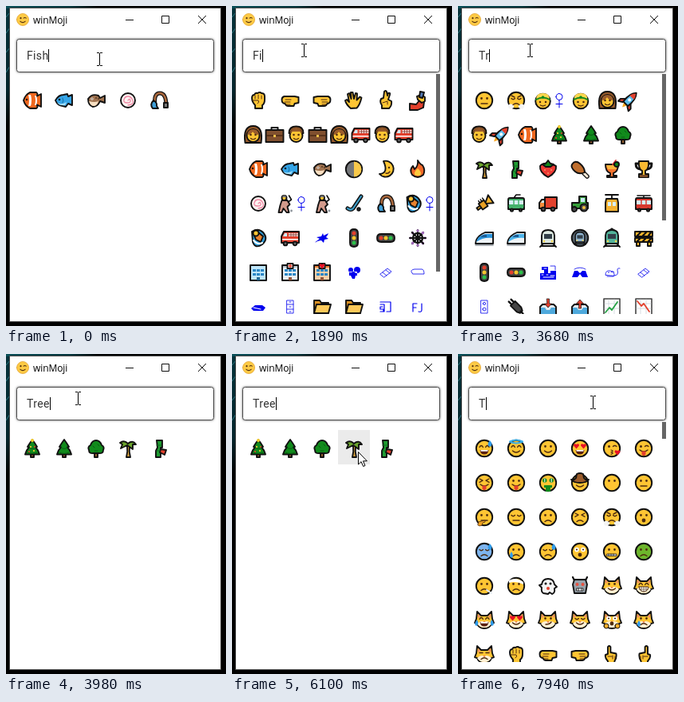
Write an HTML page that moves like this. It is 276x400 px and loops after 8 s.

```html
<!DOCTYPE html>
<html lang="en">
<head>
<meta charset="utf-8">
<title>winMoji</title>
<style>
  html, body { margin: 0; width: 100%; height: 100%; overflow: hidden; background: #000; }
  svg { display: block; width: 276px; height: 400px; }
  #lists path, #icon path { stroke-linejoin: round; stroke-linecap: round; }
  .title { font: 12px "Open Sans", "Noto Sans", sans-serif; letter-spacing: -.1px; }
  .query { font: 14px Roboto, Arial, sans-serif; letter-spacing: .35px; fill: #333; }
  .field { fill: #fff; stroke: #4a4a4a; filter: drop-shadow(0 0 1.5px rgba(0, 0, 0, .6)); }
</style>
</head>
<body>
<svg viewBox="0 0 276 400">
  <defs>
    <linearGradient id="sea" x2="0" y2="1">
      <stop stop-color="#06333b"/><stop offset=".7" stop-color="#04252c"/><stop offset="1"/>
    </linearGradient>
    <linearGradient id="sky"><stop stop-color="#0a4f58"/><stop offset=".7" stop-color="#06363d"/><stop offset="1"/></linearGradient>
    <clipPath id="pane"><path d="M5 85h264v300h-264z"/></clipPath>
  </defs>
  <path d="M0 0h276v400h-276z"/>
  <path d="M0 0h5v150h-5z" fill="url(#sea)"/>
  <path d="M0 0h115v3h-115z" fill="url(#sky)"/>
  <path d="M0 14l5-6M0 34l5-7M0 58l5-6M0 83l5-8" stroke="#2a7680"/>
  <path d="M4.500 2.500h265v392h-265z" fill="#fff" stroke="#484848"/>
  <g id="icon" transform="translate(21 17) scale(.72)"></g>
  <text class="title" x="34" y="22">winMoji</text>
  <path d="M150 17.500h10M195.500 12.500h9v9h-9zM241 12l10 10M251 12l-10 10" fill="none" stroke="#111"/>
  <rect id="hover" y="95" width="40" height="43" fill="#ebebeb"/>
  <g id="lists" clip-path="url(#pane)"></g>
  <rect id="bar" x="256" y="85" width="5" fill="#666"/>
  <rect class="field" x="13.500" y="41.500" width="247" height="41" rx="3"/>
  <text id="query" class="query" x="26" y="67"></text>
  <rect id="caret" y="54" width="1" height="16"/>
  <g id="mouse">
    <path id="beam" d="M-3.500-8h3M.5-8h3M-3.500 8h3M.5 8h3M0-7.500v15" fill="none" stroke="#000"/>
    <path id="arrow" d="M.5.5v15.500l3.600-3.400 2.600 5.900 2.300-1-2.500-5.700h4.900z" fill="#fff" stroke="#000"/>
  </g>
</svg>
<script>
const INK = '#111', SKIN = '#ffc533', BROWN = '#4f2d10', HAIR = '#9a5c2b', RED = '#e3402d', WHITE = '#fff',
      GREEN = '#118a1c', BLUE = '#2f9bea', GREY = '#8d949b';

const path = (d, fill, stroke = 'none', w = 1) =>
  `<path d="${d}" fill="${fill}" stroke="${stroke}" stroke-width="${w}"/>`;
const O = (d, c) => path(d, c, INK, 1.9);
const F = (d, c) => path(d, c);
const L = (d, c = BROWN, w = 1.4) => path(d, 'none', c, w);
const link = d => L(d, '#00e', .8);
const circ = (x, y, r) => `M${x - r} ${y}a${r} ${r} 0 1 0 ${2 * r} 0a${r} ${r} 0 1 0 ${-2 * r} 0z`;
const pair = (x, y, r) => circ(-x, y, r) + circ(x, y, r);
const rect = (x, y, w, h) => `M${x} ${y}h${w}v${h}h${-w}z`;
const heart = (x, y) => F(`M${x} ${y + 3.5}l-3.500-4q0-3.500 3.500-1.500q3.500-2 3.500 1.500z`, '#e81224');
const turn = (a, s) => `<g transform="rotate(${a})">${s}</g>`;
const flip = s => `<g transform="scale(-1 1)">${s}</g>`;

// Pieces the faces are put together from
const disc = c => O(circ(0, 0, 10.2), c);
const part = {
  face: disc(SKIN), icy: disc('#7db4ee'), sick: disc('#6db52c'), pale: disc('#f4f4f4'),
  cat: O('M-9-11l5 5h8l5-5 1 9 2 5-3 1q-2 6-9 6t-9-6l-3-1 2-5z', SKIN) + F('M-9 4q5-5 9-2 4-3 9 2-3 5-9 5t-9-5z', '#fff1d6') +
    F('M-8-8l3 3-3 2zM8-8l-3 3 3 2z', '#f08a6c') + F('M-1.500 1.500h3l-1.500 1.500z', RED),
  dots: F(pair(3.5, -2.5, 1.4), BROWN),
  arcs: L('M-6-1.500q2.200-4 4.400 0M1.600-1.500q2.200-4 4.400 0'),
  shut: L('M-6-2.500q2.200 2.500 4.400 0M1.600-2.500q2.200 2.500 4.400 0'),
  squint: L('M-6-5l4 2.200-4 2.200M6-5l-4 2.200 4 2.200'),
  lines: L('M-6-2.500h4M2-2.500h4'),
  wink: F(circ(-3.5, -2.5, 1.5), BROWN) + L('M1.500-2.500q2.200-2 4.400 0'),
  wide: F(pair(4, -2.5, 2.8), WHITE) + F(pair(4, -2.5, 1.1), BROWN),
  roll: F(pair(4, -2.5, 2.8), WHITE) + F(pair(4, -4, 1.3), BROWN),
  hearts: heart(-4.5, -3) + heart(4.5, -3),
  shades: F('M-10-5h20l-1.500 4q-4 3.500-7-1h-3q-3 4.500-7 1z', INK),
  specs: path(pair(4.5, -2.5, 3.6), WHITE, INK, 1.6) + F(pair(4.5, -2.5, 1.2), INK) + F(rect(-1.5, 3, 3, 3), WHITE),
  cash: F(pair(4.2, -3, 2.7), GREEN) + L('M-4.200-5v4M4.200-5v4', WHITE, 1) + F('M-5 3h10v3h-2v5h-6v-5h-2z', GREEN),
  smile: L('M-4.500 3q4.500 4 9 0'),
  open: F('M-5.500 2h11q-.5 5.500-5.500 5.500t-5.500-5.500z', '#5a2010') + F(rect(-4.5, 2, 9, 1.7), WHITE),
  teeth: path('M-6 1h12q-1 6-6 6t-6-6z', WHITE, BROWN, 1) + L('M-5.500 4h11M-3 1v5M0 1v6M3 1v5', BROWN, .6),
  gritted: path(rect(-5.5, 2, 11, 4), WHITE, BROWN, 1) + L('M-5.500 4h11M-3 2v4M0 2v4M3 2v4', BROWN, .6),
  flat: L('M-4 4h8'), frown: L('M-4 5.500q4-3.500 8 0'), round: F(circ(0, 4, 2.4), BROWN),
  kiss: L('M-1 2q4.500 1.200 0 2.700q4.500 1.200 0 2.700', BROWN, 1.2),
  smirk: L('M-3 5q5 0 7-3'),
  tongue: L('M-5 2q5 4 10 0') + F('M-2.500 3.500h5v4q-2.500 3.500-5 0z', RED),
  lick: L('M-5 2q5 6 10 0') + F('M1 5l4-3q4 3 0 5z', RED),
  zip: path(rect(-6, 3, 12, 2.5), '#c4c9ce', INK, .7) + L('M-4 3v2M-1 3v2M2 3v2', INK, .7),
  puff: F('M-3 5q-8-2-7 3t7 1zM3 5q8-2 7 3t-7 1z', '#f4f4f4') + L('M-6-6l4 2M6-6l-4 2'),
  halo: path('M-8-8.500q8-4 16 0q-8 4-16 0z', 'none', '#39aee8', 2),
  tears: F('M-9-1q-5 6-1 8q4-2 1-8zM9-1q5 6 1 8q-4-2-1-8z', BLUE),
  tear: F('M-6 0q-4 6 0 8q4-2 0-8z', BLUE), drop: F('M7-10q5 6 0 8q-5-2 0-8z', BLUE),
  blush: F(pair(7, 2, 2), '#f58f55'), nose: F(circ(0, 1, 2.3), RED),
  love: heart(7, 5),
  hat: O('M-11-4q4 1 6-2l1-5q4-2 8 0l1 5q2 3 6 2q-3 4-11 4t-11-4z', HAIR),
  wig: F(pair(9, -5, 3.5), RED) + L('M-4 4q4 4 8 0', RED, 2.5),
  palms: path(pair(7, 7, 3), '#f5ad2a', INK, 1),
  chin: path('M-7 6l3-1 5-1 0 2-3 1-1 3q-3 2-5 0z', '#f0a022', BROWN, .8),
  stick: L('M3 5l6 4', '#e6eef4', 2), band: F('M-9-7q9-5 18 2v3q-9-5-18-2z', WHITE)
};

const faces = {
  grin: 'face dots teeth', grimace: 'face dots gritted', beam: 'face arcs teeth', joy: 'face arcs open tears',
  smiley: 'face dots open', happy: 'face arcs open', phew: 'face arcs open drop', laugh: 'face squint open',
  angel: 'face arcs smile halo', winky: 'face wink smile', shy: 'face arcs smile blush', slight: 'face dots smile',
  yum: 'face arcs lick', calm: 'face shut smile', adore: 'face hearts open', kissy: 'face wink kiss love',
  peck: 'face dots kiss', peck2: 'face arcs kiss', peck3: 'face shut kiss blush', cheeky: 'face wink tongue',
  bleh: 'face squint tongue', tease: 'face dots tongue', rich: 'face cash', nerd: 'face specs', cool: 'face shades smile',
  clown: 'pale dots wig nose', cowboy: 'face dots smile hat', hug: 'face arcs open palms', smug: 'face dots smirk',
  mute: 'face dots', meh: 'face dots flat', blank: 'face lines flat', bored: 'face lines frown', eyeroll: 'face roll flat',
  think: 'face dots flat chin', fib: 'face dots nose flat', blushed: 'face wide flat blush', pensive: 'face shut flat',
  sad: 'face dots frown', endure: 'face squint frown', huff: 'face shut puff frown', gasp: 'face dots round',
  cold: 'icy shut frown drop', cry: 'face dots frown tear', sweat: 'face shut frown drop', amazed: 'face wide round',
  zipped: 'face dots zip', queasy: 'sick dots frown', fever: 'face dots frown stick', hurt: 'face dots frown band',
  cat: 'cat dots smile', catGrin: 'cat arcs teeth', catJoy: 'cat arcs open tears', catLove: 'cat hearts smile',
  catSmug: 'cat dots smirk', catKiss: 'cat shut smile', catScream: 'cat wide round palms', catCry: 'cat dots frown tear',
  catPout: 'cat lines frown'
};
const art = {};
for (const k in faces) art[k] = faces[k].split(' ').map(p => part[p]).join('');

const person = (hair, fringe) => O(hair, HAIR) + O(circ(0, 1, 8), SKIN) + F(fringe, HAIR) +
  F(pair(3, 0, 1.3), BROWN) + L('M-3 4.500q3 2.500 6 0', BROWN, 1.2);
const fistL = O('M-10.500-1q0-3 3-4h13l5 1v7l-5 1-1 3h-7q-3 0-4-3-4 0-4-5z', SKIN) + L('M-6-1h7M-7 2h7M-5 5h5', BROWN, 1);
const point = O('M-5 11v-3q-4-4-3-8l3-1v-9q1.700-2 3.400 0v7l7 1.500q1 5-2 9.500v3z', SKIN) + L('M-5 2h5M1 1v4M4 2v3', BROWN, 1);
const lights = O('M-5-6q0-5 5-5t5 5v12q0 5-5 5t-5-5z', '#454545') + F(circ(0, -6, 2.5), RED) +
  F(circ(0, 0, 2.5), '#f5c52e') + F(circ(0, 6, 2.5), '#2cc04a');
const building = (wall, trim, sign) => O(rect(-10, -9, 20, 19), wall) + F(rect(-9, -8, 18, 2), trim) +
  F([-7, -2, 3].map(x => rect(x, -4, 4, 3) + rect(x, 1, 4, 3)).join(''), '#2b87c6') + sign;
const bus = (c, top) => O('M-10-5q0-2 2-2h16q2 0 2 2v12h-20z', c) + F('M-9-4h18v5h-18z', '#d8f0f8') +
  L('M-3-4v5M3-4v5M-9 3h18', c, 1.5) + O(pair(5.5, 8, 1.6), '#555') + L(top, INK, 1.6);
const train = c => L('M-6 7l-4 4M6 7l4 4M-8 10h16', INK, 1.8) + O('M-8 7v-10q0-7 8-7t8 7v10z', c) +
  F('M-5-5h10v6h-10z', '#333f49') + F(pair(5, 4, 1.3), '#f9d34b');
const bullet = c => O('M-11 7q0-7 8-12l4-2h10v14z', '#eef3f7') + F('M-10 5q2-8 11-10h9v5q-12-1-20 5z', c) +
  F('M-5-1l4-3h4v3z', '#1d5c94') + L('M-11 9h22', GREY, 1.6);
const fir = gold => O('M-2 7h4v4h-4z', '#8a5527') + O('M0-11q3 4 6 9l-2 .5q4 4 5 9h-18q1-5 5-9l-2-.5q3-5 6-9z', GREEN) +
  L('M-4-1q4 3 8 0M-6 5q6 3 12 0', '#075e10', 1) + gold;
const chart = (d, c) => path(rect(-10, -10, 20, 20), WHITE, '#444', 1.6) + L('M-9-4h18M-9 2h18M-4-9v18M3-9v18', '#ccd3da', .8) + L(d, c, 1.8);
const tray = (d, c) => O('M-10 0l3-3h14l3 3v10h-20z', '#e3eaef') + F('M-9 1h5l2 3h4l2-3h5v8h-18z', '#4ea9dc') + path(d, c, INK, .7);
const folder = O('M-10-8h7l2 3h9v13h-18z', '#d98f22') + O('M-7-3h18l-3 11h-18z', '#fdc95a');
const sport = gear => O('M-4-4h7l3 5-3 3 2 7h-3l-4-5-2 5h-4l2-9z', '#d39a8b') + O(circ(-1, -7, 3), SKIN) + F('M-4-8q3-5 6 0z', '#777') + gear;
const engine = O('M-11-2l3-6h19v14h-22z', RED) + F('M-9-2l2-4h3v4z', '#cfeaf5') + F(rect(-2, -6, 12, 4), '#f1d6d2') +
  L('M-2-4h12M1-6v4M4-6v4M7-6v4', '#8b3b34', .8) + F(rect(-10, 1, 20, 1.5), WHITE) + O(pair(6, 7, 2.4), '#666');
const wheel = a => turn(a, L('M0-10v20', INK, 2) + F(pair(9, 0, 1.8), '#a06bb8'));

Object.assign(art, {
  rofl: turn(-35, art.joy), upside: turn(180, art.beam), fistL, fistR: flip(fistL), point, point2: flip(point),
  hundred: turn(-8, L('M-9-6v9M-4-6q-3 4 0 8q4-4 0-8zM5-6q-3 4 0 8q4-4 0-8z', INK, 4) + L('M-9-6v9M-4-6q-3 4 0 8q4-4 0-8zM5-6q-3 4 0 8q4-4 0-8zM-8 7l15-1M-4 10l9-1', '#e81224', 2)),
  digits: O(rect(-10.5, -10.5, 21, 21), '#1578d3') + L('M-4-7v5M3-7h3v2l-3 3h3M-6 2h3v5h-3M-6 4h3M3 2v3h4M6 2v5', WHITE, 1.2),
  smileLink: link(circ(0, 0, 6) + 'M-2-2v1M2-2v1M-3 2q3 3 6 0'),
  fist: O('M-8-3q0-4 3-4 1-3 4-2 3-2 5 0 4 0 4 4v4q0 5-3 7v4h-9v-4q-4-4-4-9z', SKIN) + L('M-4-6v4M0-7v5M4-6v4M-7 0h7q2 2-1 4', BROWN, 1),
  hand: O('M-4 10q-6-5-7-10l2-1 3 3-2-10 2-1 2.500 7-.5-8h2.500l1.500 8 2-7 2 .500-.500 8 4-4 2 1q-2 9-6 13z', SKIN),
  crossed: O('M-5 10v-4q-3-4-1-8l3-1 1-8q2-2 3 0l1 5 1-3q3-1 2 2l-2 6 4 2q1 5-3 9z', SKIN) + L('M-4 3l6-2v4', BROWN, 1),
  selfie: O('M-10 4l8 1 5-6 5 3-1 7-7 3h-10z', RED) + O('M-1-5l6-2 4 3 0 5-4 2-5-4z', SKIN) + O('M3-11l5 1-2 7-4-1z', '#557dba'),
  woman: person('M-10 10q-3-21 10-21t10 21z', 'M-7.500 0q1-7 7.500-7t7.500 7q-6 0-8-4-2 4-7 4z'),
  man: person('M-9-2q0-8.500 9-8.500t9 8.500z', 'M-8-1q2-7 8-7t8 7l-3-3h-10z'),
  turban: O(circ(0, 1, 9.3), SKIN) + F('M-8-1q-1-8 8-8t8 8q-8-4-16 0z', '#ffd84e') + L('M-8.500-1q8.500-5 17 0', GREEN, 2) +
    F(circ(0, -4, 1.8), GREEN) + F(pair(3.5, 2, 1.3), BROWN) + L('M-3 6q3 2 6 0'),
  briefcase: L('M-4-6v-3h8v3', INK, 2) + O(rect(-11, -6, 22, 15), '#80502f') + L('M-10 1h20', '#4a2815', 1.5) + F(rect(-1.5, 0, 3, 3), '#f0c04a'),
  rocket: turn(45, F('M-3 6h6l-3 6z', '#f9a51e') + O('M-4 1l-5 5v4l5-3zM4 1l5 5v4l-5-3z', RED) + O('M0-13q6 6 4 19h-8q-2-13 4-19z', '#5dbcec') +
    F('M0-12q3 3 3.700 7h-7.400q.7-4 3.700-7z', RED) + F(circ(0, -1, 2), WHITE)),
  engine,
  tropical: O('M-11 0q2-7 8-10h8q3 2 0 5l6-3v16l-6-3q3 3 0 5h-8q-6-3-8-10z', '#f0681f') +
    F('M-5-7h3q2 7 0 14h-3q2-7 0-14zM3-6h2q2 6 0 12h-2q2-6 0-12z', WHITE) + F(circ(-7, -1, 1.2), INK),
  fish: O('M-11 0q4-7 10-7l5-1 1 3 5-2v13l-5-2-3 4-4-1q-6 0-9-7z', '#35a5e8') + F('M-9 3q6 3 12-1l-2 4q-6 1-10-3z', '#a4def7') +
    F(circ(-6, -1, 1.3), INK) + L('M-2-3q2 3 0 6', '#1a6c9f', 1),
  puffer: O('M-10-2q5-7 13-4l2 3 6-3v9l-6-2q-3 7-9 7-6-2-6-10z', '#a07350') + F('M-9 1q7 2 12 0q-2 6-6 6t-6-6z', '#f7dfc2') +
    F(circ(-5, -2, 1.6), WHITE) + F(circ(0, -3, 1) + circ(3, -2, 1) + circ(-5, -2, .8), '#55371f'),
  naruto: O(circ(0, 0, 9), '#fbf4f1') + L('M0 0q2-3 3 0t-4 3-4-4 5-4 6 5-6 6', '#ef87a4', 1.3),
  pole: L('M-6 6q-2-15 6-15t8 16', INK, 5) + L('M-6 6q-2-15 6-15t8 16', '#a9683d', 2.6) + O('M5 3h5v6h-5z', '#777') + O('M-8 0q5 3 4 7l2 3h-7q-4-5 1-10z', '#3f9fd8'),
  halfMoon: disc('#75777a') + F('M0-9.500a9.500 9.500 0 0 1 0 19z', '#f9c94a'),
  crescent: O('M-3-10a10 10 0 1 1-5 16q12-1 5-16z', SKIN) + F(circ(4, -2, 1.2), BROWN) + L('M0 5q3 1 5-2'),
  fire: O('M0-11q3 5 6 6 4 6 1 12-7 6-14 0-4-6 1-11l2 4q5-4 4-11z', '#f0692a') + F('M0-1q6 5 3 9h-6q-3-4 3-9z', '#fdcb3e'),
  golfer: sport(L('M4-2l4-3-3-5', INK, 1.6) + F(circ(8, 9, 1.4), GREY)),
  hockey: L('M8-9l-10 15q-3 3-7 0', INK, 5) + L('M8-9l-10 15q-3 3-7 0', '#3c9bc5', 2.2) + O(circ(5, 7, 1.8), '#333'),
  surfer: O('M-8-8q8-5 14 1 7 8-1 15-9 6-12-3z', '#36a2dd') + O('M-6-5l6-2 6 5-3 7-6-3z', '#e9822e') + O(circ(-3, -6, 3.5), SKIN) + L('M-6 3q5 6 11 3', WHITE, 2),
  sparks: F('M-7 4l4-3-4-2 6-1 2-4 1 3 6-3-3 5 3 2-5 1-1 4-3-3z', '#00e') + link('M-8 5l15-9'),
  lights, lightsFlat: turn(-90, lights),
  ferris: [0, 45, 90, 135].map(wheel).join('') + path(circ(0, 0, 6), 'none', INK, 2.4),
  office: building('#bfe6f9', '#bfe6f9', F(rect(-2, 6, 4, 4), '#246a96')),
  clinic: building('#e8eef2', '#b9c4cc', O(rect(-3.5, -11, 7, 6), WHITE) + L('M0-10v4M-2-8h4', RED, 1.6) + F(rect(-2, 6, 4, 4), '#94563a')),
  hotel: building('#f6cfa8', '#e87a32', O(rect(-3.5, -11, 7, 6), WHITE) + heart(0, -8) + F(rect(-2, 6, 4, 4), '#94563a')),
  camera: F(circ(-4, -3, 3) + circ(4, -3, 4) + 'M-6-1h10v5h-10zM-4 4h6l-1 4h-3z', '#00e'),
  film: link('M-7 2l9-7 5 4-9 7zM-4 0l5 4M0-3l5 4'), ticket: link('M-8-2q1-2 4-2h9q3 0 3 6h-14z'),
  inboxLink: F('M-9 2l5-4h9l4 3-3 4h-12z', '#00e') + L('M-6 1l9 2', WHITE, 1.2),
  cabinet: link('M-4-8h8v16h-8zM-4-3h8M-4 3h8M-1-6h2M-1 0h2M-1 6h2'), folder,
  five: L('M-7-6h13v12h-5M-7-3h5M-4 0h-3v3h4v3h-4M-2-3v9', '#00e', 1.2), fj: L('M-6 6v-10h5M-6 1h4M5-4v8q0 3-4 2', '#00e', 1.2),
  fem: L(circ(0, -4.5, 4) + 'M0 0v9M-4 4.500h8', '#00e', 1),
  xmas: fir(F(circ(0, -10, 2) + circ(-2, -2, 1.1) + circ(2, 3, 1.1), '#fbd232') + F(circ(3, -2, 1) + circ(-4, 4, 1.1), RED)), pine: fir(''),
  tree: O('M-2 5h4v6h-4z', '#8a5527') + O('M-3 6q-6 1-6-4-2-4 2-6 2-6 7-6t7 6q4 2 2 6 0 5-6 4z', GREEN) + L('M-4-3l2 2M2-5l2 2M-2 3h4', '#075e10', 1),
  palm: O('M-1-3h3q-1 7 1 14h-5q2-7 1-14z', '#d9a23c') + O('M0-6q-5-5-10-1l3 2-2 5 8-4 7 5 0-6 4 0q-4-6-10-1z', '#6ba52c'),
  bamboo: O('M-4-10h7v9h-2v12h-6v-8l2-4z', '#1f9c32') + O('M1 1l7 1-2 6-6-3z', RED) + L('M-4-4h6M-4 3h4', '#0c6c1c', 1),
  berry: O('M-10-4q3-4 10-3t10 3q1 8-10 14-11-6-10-14z', '#ee3b35') + O('M-7-6l4-1 3-4 3 4 4 1-4 3h-6z', GREEN) + F(circ(-4, 1, .8) + circ(0, 5, .8) + circ(4, 1, .8), '#ffd98a'),
  drumstick: L('M3 3l6 6', INK, 5.500) + L('M3 3l6 6', '#f4e9d7', 3) + O('M-10-6q4-6 10-1 6 5 6 11-7 3-12-1-6-5-4-9z', '#bf6e2e'),
  cocktail: O('M-8-6h16q0 9-6 11v3h4v2h-12v-2h4v-3q-6-2-6-11z', '#f3732e') + F('M-7-5h14q0 3-2 5h-10z', '#fcb53b') + L('M1-6l4-5', '#e03a3a', 2) + O(circ(6, -6, 3), GREEN),
  trophy: L('M-6-7h-4q0 7 6 7M6-7h4q0 7-6 7', INK, 2.8) + O('M-6-10h12q1 10-4 12v4h4v4h-12v-4h4v-4q-5-2-4-12z', '#f9b931') + F(rect(-5, 7, 10, 3), '#7a4c27'),
  trumpet: turn(-35, O('M-11-1h14l7-5v12l-7-4h-14z', '#f7b42f') + O('M-6-4h8v9h-8z', '#e8a024') + L('M-4-7v3M-1-7v3M2-7v3', INK, 1.5)),
  trolley: bus('#45b36c', 'M-3-7l3-4h5'), aerial: L('M0-7v-4M-8-11h16', INK, 1.8) + O('M-7-6h14l1 5v11h-16v-11z', '#f5b231') + F('M-5-2h4v5h-4zM1-2h4v5h-4z', '#d8f0f8'),
  cable: bus('#d8392f', 'M-8-10h16M0-10v3'),
  truck: O(rect(-4, -8, 15, 14), '#e2412d') + O('M-11 6v-7l3-4h4v11z', '#f58c3a') + F('M-9-1l2-3h2v3z', '#c9e8f7') + O(pair(6, 7, 2.4), '#555'),
  tractor: O('M-1-9h9v8h2v7h-20v-7h9z', '#37a03a') + F(rect(1, -7, 5, 5), '#c9e8f7') + O(circ(5, 5, 4.6) + circ(-7, 7, 3), '#4b4b4b') + F(circ(5, 5, 2), '#f6c440'),
  bullet: bullet('#2a94dc'), bullet2: bullet('#4db4ea'), train: train('#dce8e0'),
  metro: O(circ(0, 0, 10.3), '#55616b') + `<g transform="scale(.72)">${train('#8fb4d0')}</g>`, tram: train('#52b39a') + L('M-3-10l3-2 3 2', INK, 1.5),
  barrier: O('M-9-4h4v14h-4zM5-4h4v14h-4z', '#f8b62d') + O(rect(-11, -8, 22, 6) + rect(-11, 0, 22, 5), '#f8b62d') +
    L('M-8-3l4-4M-1-3l4-4M6-3l3-4M-8 4l3-3M-1 4l3-3M6 4l3-3', INK, 2.2),
  skyline: F('M-10 9v-8h5v-4h-3v-4h8v8h3v-3h7v11z', '#00e') + L('M-8 3h2M-2 3h2M3 4h5M-6 6h13M-5-5h3', WHITE, 1) + link('M3-8h6v5'),
  road: F('M-10 6l3-8h4l3 3 3-3h4l3 8h-7l-3-4-3 4z', '#00e') + link('M-7-4q7-4 14 0'),
  mouse: link('M-8 3q0-6 6-5 6 2 5 6zM-1 0q2-3 4 0M3 4q6 0 4-7 0-3 3-2M-6 5h8') + F(circ(-4, 0, .8), '#00e'),
  socket: link(rect(-4, -8, 8, 16) + circ(0, -4, 1.6) + circ(0, 3, 2)),
  plug: turn(-45, O('M-4-6h8v11l-2 4h-4l-2-4z', '#444') + L('M-2-7v-4M2-7v-4M0 8v4', INK, 2.4)),
  inbox: tray('M-1.500-10h3v6h3l-4.500 5-4.500-5h3z', RED), outbox: tray('M-1.500 2h3v-6h3l-4.500-5-4.500 5h3z', RED),
  rise: chart('M-8 7l5-6 3 3 7-10', '#25a244'), fall: chart('M-8-7l5 6 3-3 7 10', RED),
  ghost: O('M-6 9q-3-2-2-7l-3-3 3-1q1-7 8-7t8 7l3 3-3 2q1 6-3 7l-3-2-2 2z', '#f4f4f4') + F(pair(3, -3, 1.5), INK) + F(circ(0, 3, 2), RED),
  robot: L('M-7-7l-2-4M7-7l2-4', INK, 2.2) + O('M-7-8h14l2 6-2 11h-14l-2-11z', '#98a2aa') + F(pair(3.5, -2, 2), '#e9503e') + path(rect(-4, 3, 8, 3), WHITE, INK, .8) + L('M-2 3v3M2 3v3', INK, .8)
});

const hands = 'fist fistL fistR', trees = 'xmas pine tree palm bamboo', sea = 'tropical fish puffer';
const results = {
  '': 'hundred digits grin grimace beam joy rofl smiley happy phew laugh angel winky shy slight upside smileLink yum ' +
    'calm adore kissy peck peck2 peck3 cheeky bleh tease rich nerd cool clown cowboy hug smug mute meh ' +
    'blank bored eyeroll think fib blushed',
  F: 'joy rofl smiley angel slight upside kissy peck cheeky tease rich nerd cool clown cowboy hug mute meh ' +
    `eyeroll think fib sad huff amazed zipped fever hurt cat catGrin catJoy woman+briefcase man+briefcase woman+engine man+engine ${hands} hand crossed selfie`,
  Fi: `${hands} hand crossed selfie woman+briefcase man+briefcase woman+engine man+engine ${sea} halfMoon crescent fire ` +
    'naruto golfer+fem golfer hockey pole surfer+fem surfer engine sparks lights lightsFlat ferris ' +
    'office clinic hotel camera film ticket inboxLink cabinet folder folder five fj',
  Fis: `${hands} ${sea} naruto pole`,
  Fish: `${sea} naruto pole`,
  T: 'phew angel slight adore kissy cheeky bleh tease rich cowboy mute meh think pensive sad endure huff gasp ' +
    'cold cry sweat amazed zipped queasy fever hurt ghost robot cat catGrin catJoy catLove catSmug catKiss catScream catCry ' +
    'catPout fist fistL fistR point point2',
  Tr: 'meh huff turban+fem turban woman+rocket man+rocket tropical xmas pine tree palm bamboo berry drumstick cocktail trophy ' +
    'trumpet trolley truck tractor aerial cable bullet bullet2 train metro tram barrier ' +
    'lights lightsFlat skyline road mouse film socket plug inbox outbox rise fall',
  Tre: `${trees} rise fall`,
  Tree: trees
};
const barHeight = { '': 17, F: 20, Fi: 247, T: 21, Tr: 183 };
const caretX = { '': 26, F: 35, Fi: 38, Fis: 45, Fish: 53, T: 35, Tr: 39, Tre: 47, Tree: 55 };

// Cells flow left to right and wrap like inline boxes
function layout(names) {
  let x = 13, y = 118, out = '';
  for (const item of names.split(' ')) {
    const glyphs = item.split('+'), widths = glyphs.map(g => g === 'fem' ? 14 : 27);
    const sum = widths.reduce((a, b) => a + b), w = Math.max(40, sum);
    if (x + w > 261) { x = 13; y += 43; }
    let gx = x + (w - sum) / 2;
    glyphs.forEach((g, i) => {
      out += `<g transform="translate(${gx + widths[i] / 2} ${y})">${art[g]}</g>`;
      gx += widths[i];
    });
    x += w;
  }
  return out;
}

const typing = [[0, 'Fish'], [1740, 'Fis'], [1890, 'Fi'], [2040, 'F'], [3030, ''], [3560, 'T'], [3680, 'Tr'],
  [3830, 'Tre'], [3980, 'Tree'], [7640, 'Tr'], [7940, 'T']];
const blinks = [0, 270, 760, 1180, 1740, 2610, 3030, 4390, 4850, 5440, 5830, 6370, 6930, 7360, 7640];
// time, x, y, hovered cell (-1: arrow over none)
const moves = [[0, 117, 66], [520, 112, 74], [640, 100, 141, -1], [760, 89, 127, 1], [910, 91, 69], [1060, 91, 60],
  [1180, 91, 56], [1330, 90, 55], [5440, 91, 55], [5560, 134, 66], [5680, 127, 83], [5830, 123, 121, 2],
  [5980, 142, 126, 3], [6100, 158, 122, 3], [6250, 176, 116, 4], [6370, 205, 108, 4], [6490, 198, 102, 4], [6650, 169, 60]];

const $ = id => document.getElementById(id);
const set = (id, name, value) => $(id).setAttribute(name, value);
const show = (id, on) => set(id, 'visibility', on ? 'visible' : 'hidden');
const latest = (track, t) => track.filter(e => e[0] <= t).pop();

$('icon').innerHTML = path(circ(0, 0, 10.5), '#fdca45', '#e0a030', 1) + part.wink + part.smile;
$('lists').innerHTML = Object.keys(results).map(k => `<g id="list-${k}" visibility="hidden">${layout(results[k])}</g>`).join('');

let shown = null;
function showQuery(text) {
  if (shown !== null) show('list-' + shown, false);
  show('list-' + text, true);
  $('query').textContent = text || 'Search';
  $('query').style.fill = text ? '' : '#a6a6a6';
  set('caret', 'x', caretX[text]);
  set('bar', 'height', barHeight[text] || 0);
  shown = text;
}

function draw(now) {
  const t = now % 8000;
  const text = latest(typing, t)[1];
  if (text !== shown) showQuery(text);
  show('caret', blinks.filter(b => b <= t).length % 2);
  const [, x, y, cell] = latest(moves, t);
  set('mouse', 'transform', cell === undefined ? `translate(${x + .5} ${y + .5})` : `translate(${x} ${y})`);
  show('beam', cell === undefined);
  show('arrow', cell !== undefined);
  show('hover', cell > 0);
  if (cell > 0) set('hover', 'x', 13 + 40 * cell);
}

const start = performance.now();
function tick() {
  draw(performance.now() - start);
  requestAnimationFrame(tick);
}
tick();
</script>
</body>
</html>
```
